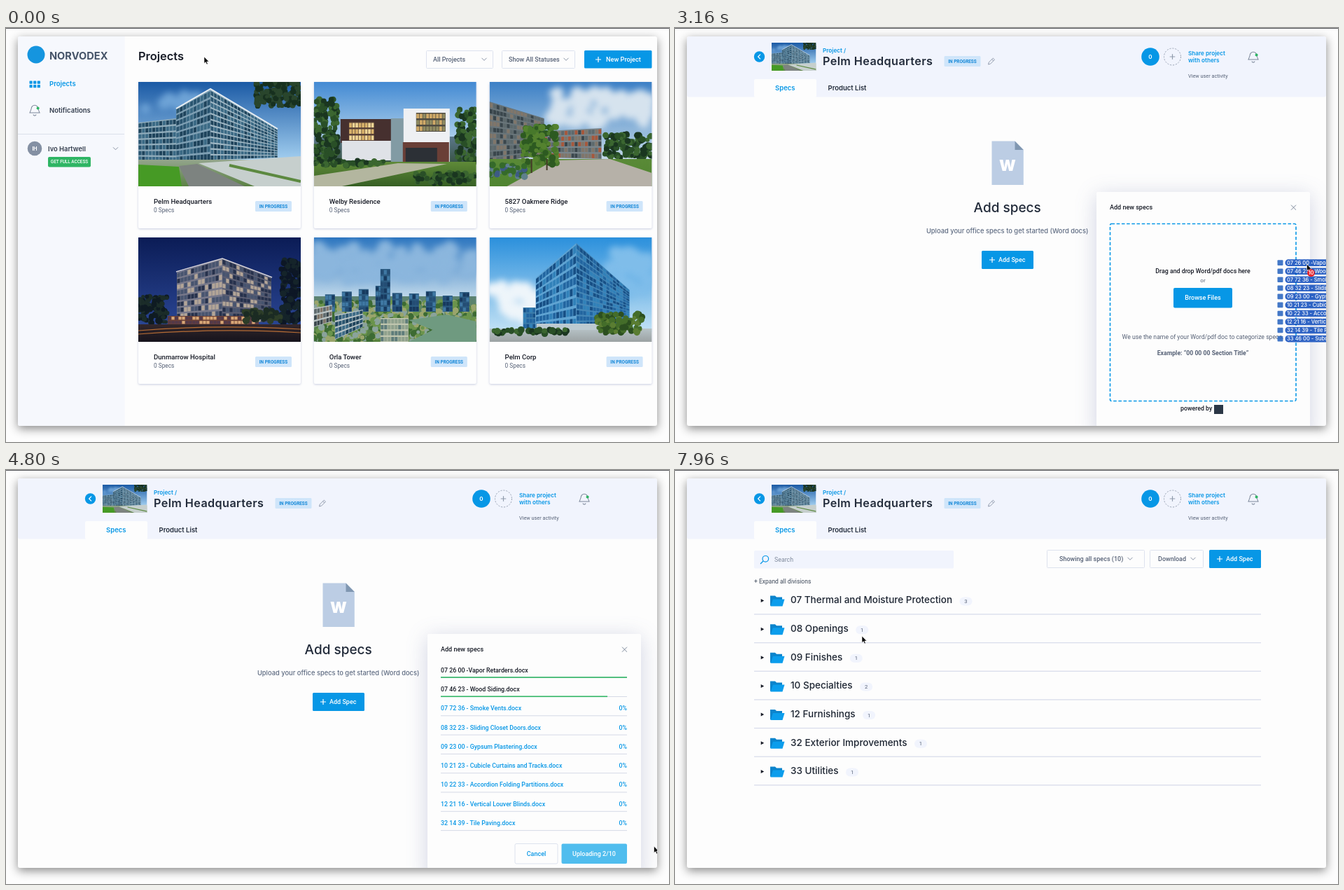
An HTML page that plays this animation: 947 px wide and 591 px high, repeating every 8000 ms.

```html
<!DOCTYPE html>
<html lang="en">
<head>
<meta charset="utf-8">
<title>Project specs upload</title>
<style>
html, body { margin: 0; width: 100%; height: 100%; overflow: hidden; background: #fdfdfd; }
svg { display: block; width: 100vw; height: 100vh; }
text { font-family: Roboto, sans-serif; white-space: pre; }
.wide { font-family: Inter, sans-serif; }
.window { filter: drop-shadow(0 4px 7px rgba(0,0,0,.46)); }
.card { filter: drop-shadow(0 1px 1.5px rgba(60,80,150,.28)); }
.dialog { filter: drop-shadow(0 5px 15px rgba(60,75,140,.23)); }
.cloud { filter: blur(5px); }
.tree { filter: blur(.7px); }
</style>
</head>
<body>
<svg id="stage" viewBox="0 0 947 591" preserveAspectRatio="none"></svg>
<script>
const LOOP = 8000;
const BLUE = '#0797e6', INK = '#171b26', GREY = '#566176', PALE = '#f1f4fd', PAGE = '#fdfdfd', GREEN = '#2fb564';
const stage = document.getElementById('stage');
const $ = id => document.getElementById(id);
const range = n => [...Array(n).keys()];

// Drawing helpers: each returns SVG markup.
const rect = (x, y, w, h, fill, more = '') => `<rect x="${x}" y="${y}" width="${w}" height="${h}" fill="${fill}" ${more}/>`;
const circle = (x, y, r, fill, more = '') => `<circle cx="${x}" cy="${y}" r="${r}" fill="${fill}" ${more}/>`;
const poly = (pts, fill) => `<polygon points="${pts}" fill="${fill}"/>`;
const line = (d, color, w = 1, more = '') => `<path d="${d}" fill="none" stroke="${color}" stroke-width="${w}" ${more}/>`;
const group = (id, ...parts) => `<g id="${id}">${parts.join('')}</g>`;
const text = (x, y, s, size, weight = 400, fill = INK, more = '') =>
  `<text x="${x}" y="${y}" font-size="${size}" font-weight="${weight}" fill="${fill}" ${more}>${s}</text>`;
const wide = (x, y, s, size, weight, fill, more = '') => text(x, y, s, size, weight, fill, `class="wide" ${more}`);
const MID = 'text-anchor="middle"', END = 'text-anchor="end"';

const chevron = (x, y) => line(`M${x - 3.5} ${y - 1.7}l3.5 3.5 3.5-3.5`, '#8a94a6');
const plus = (x, y, color = '#fff', r = 4) => line(`M${x - r} ${y}h${2 * r}M${x} ${y - r}v${2 * r}`, color, 1.2);
const button = (x, y, w, label, more = '') =>
  rect(x, y, w, 26, BLUE, `rx="1.5" ${more}`) + plus(x + 15, y + 13) + text(x + 24, y + 16, label, 9, 500, '#fff');
const select = (x, y, w, label, pad = 10) =>
  rect(x + .5, y + .5, w - 1, 25, PAGE, 'stroke="#dde2ee" rx="1"') + text(x + pad, y + 16, label, 9, 500, GREY)
  + chevron(x + w - pad - 3, y + 12.5);
const status = (x, y) => rect(x, y, 52, 15, '#cfe5fa', 'rx="1.5"') + text(x + 26, y + 9.8, 'IN PROGRESS', 6.4, 700, '#1588d8', MID);
const bell = (x, y) => `<g transform="translate(${x} ${y})">` +
  line('M-7 4Q-5-1-4.8-2A4.8 4.8 0 0 1 4.8-2Q5-1 7 4ZM-2 6.5a2 1.6 0 0 0 4 0', '#7f8a9c', 1.1) + circle(4.6, -2.6, 2, GREEN) + '</g>';

// Photo pieces, in a 232 x 149 picture.
let seed = 7, fades = 0;
const rand = () => (seed = (seed * 16807) % 2147483647) / 2147483647;
const pick = list => list[Math.floor(rand() * list.length)];
const mix = (a, b, u) => a + (b - a) * u;

function fade(y, h, top, low) {
  const id = 'fade' + fades++;
  return `<linearGradient id="${id}" x2="0" y2="1"><stop stop-color="${top}"/><stop offset="1" stop-color="${low}"/></linearGradient>`
    + rect(0, y, 232, h, `url(#${id})`);
}
function blobs(kind, x, y, w, h, r, colors) {
  const n = Math.round(w * h / r / r * 1.4);
  return `<g class="${kind}">` + range(n).map(() =>
    circle((x + rand() * w).toFixed(1), (y + rand() * h).toFixed(1), (r * mix(.5, 1, rand())).toFixed(1), pick(colors))).join('') + '</g>';
}
const trees = (x, y, w, h, colors = ['#1a3620', '#294f27', '#3b6630']) => blobs('tree', x, y, w, h, 5, colors);
const clouds = (x, y, w, h, color) => blobs('cloud', x, y, w, h, 11, [color]);

// A wall between two upright edges [x, top, bottom], with bands of panes.
function wall([x, top, low], [X, Top, Low], base, panes) {
  const cols = Math.ceil((X - x) / 5), rows = Math.ceil((low - top) / 9);
  const at = (u, v) => [mix(x, X, u), mix(mix(top, low, v), mix(Top, Low, v), u)].map(n => +n.toFixed(1));
  return poly([[x, top], [X, Top], [X, Low], [x, low]], base) + range(cols * rows).map(k => {
    const u = (k % cols + .08) / cols, U = u + .84 / cols, v = (Math.floor(k / cols) + .18) / rows, V = v + .72 / rows;
    return poly([at(u, v), at(U, v), at(U, V), at(u, V)], pick(panes));
  }).join('');
}
const block = (x, y, w, h, base, panes) => wall([x, y, y + h], [x + w, y, y + h], base, panes);
const tower = (x, top) => block(x, top, 14, 106 - top, '#2b5a80', ['#17395e', '#244d74', '#3f78a3']);

const glass = ['#1e435b', '#2a5570', '#3b6a85'], deep = ['#174f85', '#2265a0', '#3181b9'], night = ['#26314c', '#47546f', '#b3a597'];
const slats = ['#3a464c', '#5d696c', '#80766a'];
const photos = [
  () => fade(0, 115, '#1b5aa5', '#a6d2f2') + clouds(10, 20, 80, 20, '#6ea3d6')
    + wall([0, 58, 113], [54, 52, 115], '#8fabba', glass) + wall([54, 38, 114], [103, 11, 112], '#7e9fb3', glass)
    + wall([103, 11, 112], [199, 68, 108], '#9fb7c4', glass) + line('M54 38L103 10L199 67', '#e8eef2', 2)
    + trees(168, 0, 64, 35, ['#17301f', '#29452c']) + fade(111, 38, '#93a58c', '#5c8245')
    + poly('0,118 58,121 62,149 0,149', '#469a25') + poly('58,120 84,117 152,149 72,149', '#7d8380')
    + poly('86,116 232,106 232,149 166,149', '#c6cfcd') + line('M130 119L232 142', '#5c8940', 4),
  () => fade(0, 110, '#438ad3', '#d2e7f3') + fade(78, 40, '#5c788c', '#35513f') + trees(0, 25, 34, 90) + trees(204, 38, 28, 75)
    + rect(38, 53, 76, 34, '#46302f') + block(50, 57, 36, 27, '#5b4338', ['#d9b26b', '#f0d595']) + rect(40, 84, 74, 28, '#dfe2e7')
    + rect(110, 52, 20, 63, '#829ba4') + rect(128, 38, 66, 80, '#eef0f3') + block(146, 44, 42, 27, '#4e4b42', ['#d0aa68', '#8f8b62'])
    + rect(127, 86, 66, 32, '#6a3f37') + rect(131, 94, 45, 24, '#2c3036') + fade(114, 35, '#5f8a38', '#365f24')
    + poly('120,116 190,117 40,149 0,149 0,134', '#b3b69f') + trees(0, 112, 100, 7) + trees(145, 130, 85, 15),
  () => fade(0, 115, '#3c80c6', '#c9dce9') + clouds(85, 15, 145, 45, '#d6e3ee') + wall([0, 28, 116], [78, 52, 104], '#69757a', slats)
    + wall([78, 70, 108], [160, 66, 110], '#79858b', [...slats, '#a6583c']) + trees(165, 74, 67, 34) + fade(110, 39, '#5a8a37', '#4f8430')
    + poly('92,112 172,110 232,130 232,149 25,149', '#b6b1a8') + trees(46, 64, 50, 55, ['#2d5a21', '#47782b', '#54822f'])
    + line('M60 110v20M82 110v16', '#453927', 2) + trees(0, 118, 50, 18, ['#3d5b84', '#356a2a', '#5f7f8c']),
  () => fade(0, 130, '#0b1c56', '#2b4795') + trees(0, 84, 42, 38, ['#0f1b22', '#1b2c29'])
    + wall([55, 50, 124], [120, 30, 124], '#77788a', night) + wall([120, 30, 124], [190, 58, 120], '#5b5e72', night)
    + block(42, 112, 130, 12, '#6a4036', ['#d9a878', '#53394a']) + line('M54 49L120 30L191 57', '#d8d4d8', 1.5)
    + trees(204, 32, 28, 90, ['#0d1726', '#15242a']) + trees(150, 104, 55, 16, ['#1b2b23', '#2d3d28']) + fade(124, 25, '#33272b', '#15131c')
    + line('M0 133Q110 124 232 131M0 138Q120 129 232 136', '#b56c35', 1.2),
  () => fade(0, 95, '#2d76c0', '#cfe3ef') + clouds(0, 15, 232, 45, '#8bb6dd') + fade(84, 65, '#5d8374', '#55803a')
    + trees(0, 92, 232, 57, ['#3d6b33', '#6b944c', '#9aa56c', '#8aa39b']) + poly('135,149 170,132 135,118 190,110 232,120 232,149', '#6f9a80')
    + range(9).map(i => tower(16 + 24 * i, mix(66, 84, rand()))).join('') + tower(95, 45)
    + wall([0, 101, 128], [26, 96, 120], '#b9c3c3', slats) + wall([30, 111, 146], [70, 103, 128], '#b7c4c7', glass)
    + block(95, 115, 40, 34, '#bfc5ae', ['#5e7c7a', '#8fa18d']),
  () => fade(0, 135, '#2b90dc', '#c3e2f5') + clouds(0, 68, 80, 48, '#eef5fa') + clouds(170, 20, 60, 60, '#7fbdea')
    + block(48, 100, 18, 30, '#3d7daa', deep) + wall([66, 58, 130], [124, 8, 128], '#5fa3d2', deep)
    + wall([124, 8, 128], [200, 75, 122], '#4586b6', deep) + fade(130, 19, '#b7c3c7', '#9ba2a3') + rect(67, 123, 133, 9, '#bccad1')
    + trees(5, 131, 110, 7) + trees(152, 108, 66, 28, ['#2c4f20', '#446d2a', '#5a7d32'])
].map((draw, i) => `<symbol id="photo${i}" viewBox="0 0 232 149" preserveAspectRatio="none">${draw()}</symbol>`).join('');
const photo = (i, x, y, w, h) => `<use href="#photo${i}" x="${x}" y="${y}" width="${w}" height="${h}"/>`;

const projects = ['Pelm Headquarters', 'Welby Residence', '5827 Oakmere Ridge', 'Dunmarrow Hospital', 'Orla Tower', 'Pelm Corp'];
const card = (name, i) => {
  const x = 189 + 250.8 * (i % 3), y = 77 + 222 * Math.floor(i / 3);
  return rect(x, y, 232, 209, '#fefefe', 'class="card" rx="2"') + photo(i, x, y, 232, 149)
    + text(x + 22, y + 174, name, 9.6, 500) + text(x + 22, y + 186, '0 Specs', 8.3, 400, GREY) + status(x + 167, y + 170);
};

const home = group('home',
  rect(17, 12, 152.5, 556, '#f6f8fd'), circle(43, 38, 12.5, '#1595df'), wide(62, 45, 'NORVODEX', 14.6, 700, '#465468'),
  range(6).map(i => rect(33.5 + 5.6 * (i % 3), 75.5 + 5.6 * (i > 2), 4.2, 4.2, BLUE, 'rx=".6"')).join(''),
  wide(62, 83, 'Projects', 9.5, 600, BLUE), bell(41, 117), wide(62, 120.5, 'Notifications', 9.5, 600, '#333d4d'),
  rect(17, 151, 152, 1, '#dbe0ea'), circle(41, 172, 10.3, '#8490a3'), wide(41, 174.6, 'IH', 7, 700, '#fff', MID),
  wide(60, 176, 'Ivo Hartwell', 9.4, 600, '#333d4d'), chevron(156.5, 172),
  rect(60, 184, 61, 14.5, GREEN, 'rx="2"'), text(90.5, 193.4, 'GET FULL ACCESS', 6.4, 500, '#fff', MID),
  wide(189, 46, 'Projects', 16.4, 600, INK), select(600, 32, 96, 'All Projects'), select(708, 32, 105, 'Show All Statuses'),
  rect(826, 32, 96.5, 25.5, BLUE, 'rx="1.5"'), plus(846, 45), text(857, 48, 'New Project', 9.2, 500, '#fff'),
  projects.map(card).join(''));

const header = group('header',
  rect(17, 12, 913, 86.5, PALE, 'rx="3"'), circle(120.5, 41, 7.7, BLUE), line('M122 37.6l-3.4 3.4 3.4 3.4', '#fff', 1.2),
  photo(0, 138, 21, 63.5, 40), wide(211, 35.3, 'Project /', 8.2, 600, BLUE),
  wide(211, 53, projects[0], 16.2, 600, '#222b3a', 'letter-spacing=".4"'), status(384.5, 40),
  line('M447.5 52l.8-3 6-6 2.2 2.2-6 6zM452.6 44.7l2.2 2.2', '#8a94a6', .9),
  circle(679, 41, 12.8, BLUE), wide(679, 44, '0', 8, 600, '#fff', MID),
  circle(710.5, 41, 12, 'none', 'stroke="#9aa4b5" stroke-dasharray="2.2 1.8"'), plus(710.5, 41, '#8f9aab', 3.8),
  wide(733, 39, 'Share project', 8.2, 600, BLUE), wide(733, 49, 'with others', 8.2, 600, BLUE),
  text(733, 71, 'View user activity', 7.3, 400, GREY), bell(826, 41),
  rect(113, 73, 89, 26, PAGE, 'rx="2"'), wide(157.3, 89.3, 'Specs', 9.5, 600, BLUE, MID), wide(246, 89.3, 'Product List', 9.5, 600, '#222b3a', MID));

const empty = group('empty',
  poly('452.5,161.5 485.5,161.5 497.8,174 497.8,224 452.5,224', '#bccde4'), poly('485.5,161.5 497.8,174 485.5,174', '#8097b1'),
  wide(475, 203.8, 'W', 22, 900, '#fff', MID), wide(474.7, 263, 'Add specs', 19, 500, '#222b3a', MID),
  wide(474.7, 293, 'Upload your office specs to get started (Word docs)', 9.35, 500, '#5d6a80', MID),
  button(438, 318, 74, 'Add Spec', 'id="add"'));

const files = ['07 26 00 -Vapor Retarders', '07 46 23 - Wood Siding', '07 72 36 - Smoke Vents', '08 32 23 - Sliding Closet Doors',
  '09 23 00 - Gypsum Plastering', '10 21 23 - Cubicle Curtains and Tracks', '10 22 33 - Accordion Folding Partitions',
  '12 21 16 - Vertical Louver Blinds', '32 14 39 - Tile Paving', '33 46 00 - Subdrainage'].map(f => f + '.docx');
const shown = files.slice(0, 9);

const drop = group('drop',
  rect(621.5, 279.5, 265.5, 253, 'none', `id="zone" rx="2" stroke="${BLUE}" stroke-width="1.6" stroke-dasharray="4.6 2.6"`),
  text(754, 350, 'Drag and drop Word/pdf docs here', 8.8, 500, INK, MID), text(754, 362.5, 'or', 8, 400, GREY, MID),
  rect(712, 371, 84, 28.5, BLUE, 'rx="2"'), text(754, 388, 'Browse Files', 9, 500, '#fff', MID),
  text(754, 444, 'We use the name of your Word/pdf doc to categorize specs.', 8.7, 400, GREY, MID),
  text(754, 467.3, 'Example: “00 00 00 Section Title”', 8.7, 700, GREY, MID),
  text(722, 546.3, 'powered by', 8.8, 500), rect(770, 538, 13, 13, '#2b3746'));

const upload = group('upload',
  shown.map((name, i) => `<g transform="translate(0 ${27.3 * i})">`
    + text(621, 288.7, name, 8.8, 500, BLUE, `id="name${i}"`) + text(887, 288.7, '0%', 8.8, 500, BLUE, `id="pct${i}" ${END}`)
    + rect(621, 295.7, 266, 1, '#d5dae6') + rect(621, 295.2, 0, 1.6, GREEN, `id="bar${i}"`) + '</g>').join(''),
  rect(727, 533.5, 61, 28.5, PAGE, 'rx="2" stroke="#dde2ee"'), text(757.5, 551, 'Cancel', 9, 500, BLUE, MID),
  rect(793.5, 533.5, 93.5, 28.5, '#50bdee', 'rx="2"'), text(840, 551, '', 9, 500, '#fff', `id="count" ${MID}`));

const dialog = group('dialog', rect(602, 234, 305, 350, PAGE, 'class="dialog" rx="2"'),
  text(621, 258.7, 'Add new specs', 9, 500), line('M880 252.7l7 7m0-7l-7 7', '#7f8a9c'), drop, upload);

const divisions = ['07 Thermal and Moisture Protection', '08 Openings', '09 Finishes', '10 Specialties',
  '12 Furnishings', '32 Exterior Improvements', '33 Utilities'];
const countOf = name => files.filter(f => f.startsWith(name.slice(0, 2))).length;
const specs = group('specs',
  rect(113, 115, 285, 25.5, PALE, 'rx="1.5"'), circle(129.3, 126.8, 4.3, 'none', `stroke="${BLUE}" stroke-width="1.2"`), line('M126 130l-4 4', BLUE, 1.3),
  text(142, 131, 'Search', 8.8, 400, '#7f8a9c'), select(531, 114, 140, 'Showing all specs (10)', 18), select(678, 114, 77, 'Download', 12),
  button(763, 114, 74, 'Add Spec'), text(113, 162, '+ Expand all divisions', 8.5, 400, '#3d4859'),
  divisions.map((name, i) => `<g transform="translate(0 ${40.65 * i})">`
    + poly('122.7,184 127.2,186.5 122.7,189', INK)
    + line('M136 194V179.5h7l2 2h8v4', 'none', 0, 'style="fill:#0b84cc"') + poly('136.5,194.5 140,184.5 156.5,184.5 153.5,194.5', '#0b9dec')
    + wide(165, 190.3, name, 13.5, 500, '#1d2532', 'data-division')
    + '<g class="tally">' + rect(-9, 181.5, 18, 12, PALE, 'rx="6"') + text(0, 190.2, countOf(name), 7.6, 400, GREY, MID) + '</g>'
    + rect(113, 205.3, 724, 1.3, '#d9ddec') + '</g>').join(''));

const drag = group('drag',
  files.map((name, i) => `<g transform="translate(0 ${12.05 * i})">` + rect(0, -3.8, 8, 7.6, '#2b66c0', 'rx="1"')
    + rect(11, -4.8, 0, 9.6, '#1450be', 'class="pill" rx="4.5"') + wide(13.5, 2.8, name, 7.5, 500, '#fff', 'data-file') + '</g>').join(''));
const badges = group('badges', group('ok', circle(6, 0, 5.4, '#2cab27'), plus(6, 0, '#fff', 3)),
  group('num', circle(0, 0, 5.4, '#e8272f'), wide(0, 2.7, '10', 7, 600, '#fff', MID)));
const cursor = `<path id="cursor" d="M0 0V9.6L2.2 7.6 3.7 11 5.3 10.3 3.8 7.1H6.8Z" fill="#000" stroke="#fff" stroke-width=".6"/>`;

stage.innerHTML = `<defs>${photos}<clipPath id="win">${rect(17, 12, 913, 556, '#000', 'rx="3"')}</clipPath></defs>`
  + rect(0, 0, 947, 591, PAGE) + rect(0, 0, 947, 1, '#55565a') + rect(17, 12, 913, 556, PAGE, 'class="window" rx="3"')
  + '<g clip-path="url(#win)">' + home
  + line('M491.4 305.3A9.2 9.2 0 1 1 491.4 294.7', BLUE, 2, 'id="spinner"')
  + group('link', rect(17, 556, 95.5, 12, '#d6d8dd', 'rx="1.5"'), wide(21, 565, 'norvodex.net/project/35', 7.7, 400, '#2c323c'))
  + header + empty + specs + dialog + drag + cursor + badges + '</g>';

const show = (id, on) => { $(id).style.display = on ? '' : 'none'; };
const place = (el, x, y) => el.setAttribute('transform', `translate(${x} ${y})`);
const between = (t, a, b) => t >= a && t < b;
const clamp = u => Math.min(1, Math.max(0, u));

// Pills and tallies follow the width of their label.
const widths = key => [...document.querySelectorAll(`[data-${key}]`)].map(el => el.getComputedTextLength());
const pills = document.querySelectorAll('.pill'), tallies = document.querySelectorAll('.tally');
widths('file').forEach((w, i) => pills[i].setAttribute('width', w + 6));
widths('division').forEach((w, i) => place(tallies[i], 165 + w + 19.5, 0));

// Cursor trips: start and end time, destination, pace of x and of y.
const smooth = u => u * u * (3 - 2 * u), steady = u => u, settle = u => 1 - (1 - u) ** 2;
const trips = [
  { a: 30, b: 660, to: [340, 179] },
  { a: 1600, b: 2400, to: [488, 330] },
  { a: 2500, b: 2850, to: [972, 302] },
  { a: 2950, b: 3630, to: [748, 369], pace: [steady, settle] },
  { a: 4030, b: 4760, to: [925.5, 537] },
  { a: 7340, b: 7350, to: [945, 537] },
  { a: 7600, b: 7960, to: [267, 237] }
];
function pointer(t) {
  let spot = [283, 41];
  for (const { a, b, to, pace = [smooth, smooth] } of trips)
    spot = spot.map((v, k) => mix(v, to[k], pace[k](clamp((t - a) / (b - a)))));
  return spot;
}

const OPEN = 1240, GRAB = 2950, DROP = 4030, SEND = 4480, EACH = 280, DONE = 7300;

function draw(t) {
  const [x, y] = pointer(t);
  const held = between(t, GRAB, DROP), inside = held && x < 887;
  place($('cursor'), x, y);

  show('home', t < 800);
  show('spinner', between(t, 800, OPEN));
  $('spinner').setAttribute('transform', `rotate(${(t - 830) * .36} 484 300)`);
  show('link', t < OPEN && y > 77);
  show('header', t >= OPEN);
  show('empty', between(t, OPEN, DONE));
  $('add').setAttribute('fill', between(t, OPEN, GRAB) && x > 438 && x < 512 && y > 318 ? '#2aa6ec' : BLUE);
  show('specs', t >= DONE);

  show('dialog', between(t, 2500, DONE));
  place($('dialog'), 0, 340 * (1 - clamp((t - 2500) / 300)) ** 3);
  show('drop', t < DROP);
  $('zone').setAttribute('fill', inside ? '#c9ccd4' : 'none');

  show('drag', held);
  show('badges', held);
  show('ok', inside);
  place($('drag'), x - (inside ? 47 : 42), y - 2);
  $('drag').setAttribute('opacity', inside ? 1 : .88);
  place($('badges'), x, y + 12.5);
  place($('num'), inside ? 16 : 6, 0);

  // Each file jumps to nine tenths, then waits for its turn to end.
  show('upload', t >= DROP);
  const sent = (t - SEND) / EACH;
  shown.forEach((_, i) => {
    const part = sent - i;
    $('name' + i).setAttribute('fill', part > 0 ? INK : BLUE);
    $('bar' + i).setAttribute('width', 266 * (part >= 1 ? 1 : Math.min(.895, clamp(part) * 7)));
    show('pct' + i, part <= 0);
  });
  $('count').textContent = `Uploading ${Math.min(10, Math.floor(Math.max(0, sent)) + 1)}/10`;
}

const start = performance.now();
function tick() {
  draw((performance.now() - start) % LOOP);
  requestAnimationFrame(tick);
}
tick();
</script>
</body>
</html>
```
